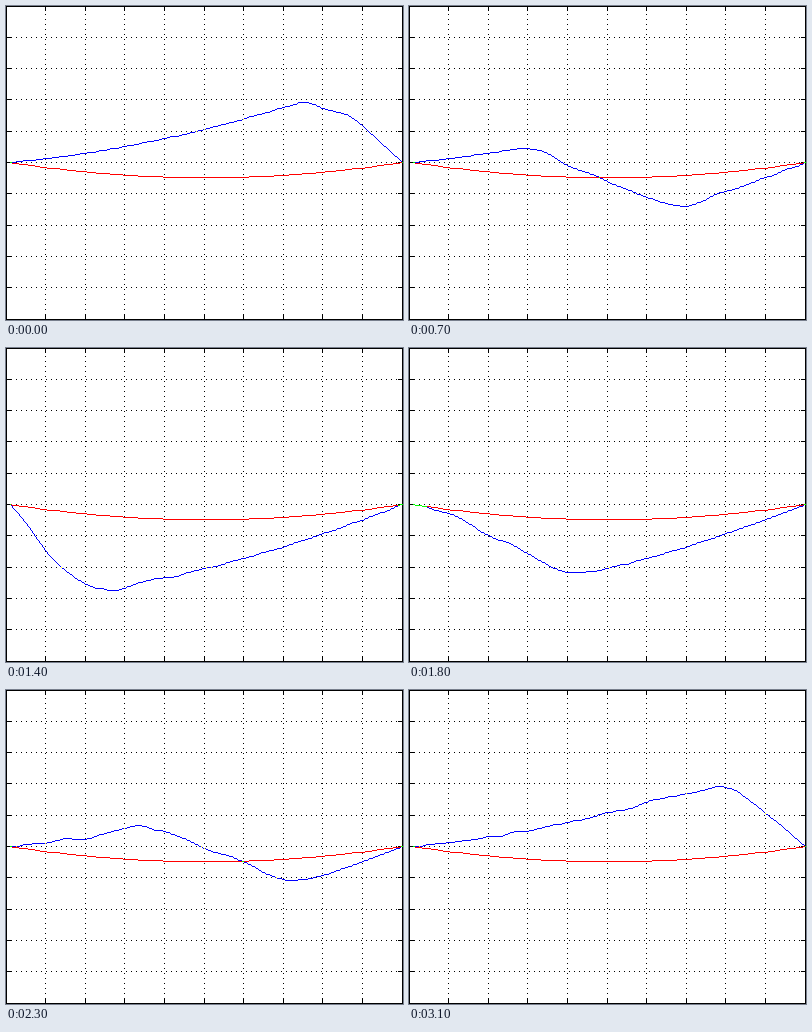
Animation, 397 px wide and 314 px high, one loop 3200 ms. Source, as a matplotlib script:

```python
import numpy as np
import matplotlib.pyplot as plt
from matplotlib.animation import FuncAnimation

W, H = 397, 314
FRAMES, STEP_MS = 32, 100
DPI = 100

# Dispersive string, plucked near its right end and sagging at rest
POINTS = 100
MODES = 40
PERIOD = 30.9            # frames per swing of the lowest mode
LEFT, RIGHT = 4, W - 1
MID = (H - 1) / 2
SAG = 15.2
PLUCK, HEIGHT = 0.811, 79

u = np.linspace(0, 1, POINTS)
sag = 4 * SAG * u * (1 - u)
mode = np.arange(1, MODES)
shapes = np.sin(np.pi * np.outer(mode, u))
coef = (2 * HEIGHT * np.sin(mode * np.pi * PLUCK)
        / (mode ** 2 * np.pi ** 2 * PLUCK * (1 - PLUCK)))
omega = 4 * MODES / PERIOD * np.sin(mode * np.pi / (2 * MODES))

DOT_GAP = 5
RED = (255, 0, 0)
BLUE_XOR = np.array([255, 255, 0], np.uint8)


def line_mask(drop):
    """One-pixel polyline through the points, given their drop below the middle."""
    mask = np.zeros((H, W), bool)
    px = np.floor(LEFT + u * (RIGHT - LEFT)).astype(int)
    py = np.floor(MID + drop + 1e-6).astype(int)
    for x0, y0, x1, y1 in zip(px, py, px[1:], py[1:]):
        n = max(abs(x1 - x0), abs(y1 - y0)) + 1
        xs = np.rint(np.linspace(x0, x1, n)).astype(int)
        ys = np.rint(np.linspace(y0, y1, n)).astype(int)
        mask[ys, xs] = True
    return mask


def make_backdrop():
    img = np.full((H, W, 3), 255, np.uint8)
    for k in range(1, 10):
        x = (W - 1) * k // 10
        y = (H - 1) * k // 10
        img[::-DOT_GAP, x] = 0
        img[y, ::DOT_GAP] = 0
        img[:5, x] = img[-5:, x] = 0
        img[y, :5] = img[y, -5:] = 0
    img[[0, -1]] = 0
    img[:, [0, -1]] = 0
    img[line_mask(sag)] = RED
    return img


backdrop = make_backdrop()


def render(i):
    swing = (coef * np.cos(omega * (i + 1))) @ shapes
    img = backdrop.copy()
    # the moving line is XOR-drawn: blue on white, green on red, yellow on black
    img[line_mask(sag - swing)] ^= BLUE_XOR
    return img


fig = plt.figure(figsize=(W / DPI, H / DPI), dpi=DPI)
ax = fig.add_axes([0, 0, 1, 1])
ax.axis("off")
view = ax.imshow(render(0), interpolation="nearest", aspect="auto")


def update(i):
    view.set_data(render(i))
    return [view]


anim = FuncAnimation(fig, update, frames=FRAMES, interval=STEP_MS,
                     repeat=True, repeat_delay=0, blit=False)
plt.show()
```
